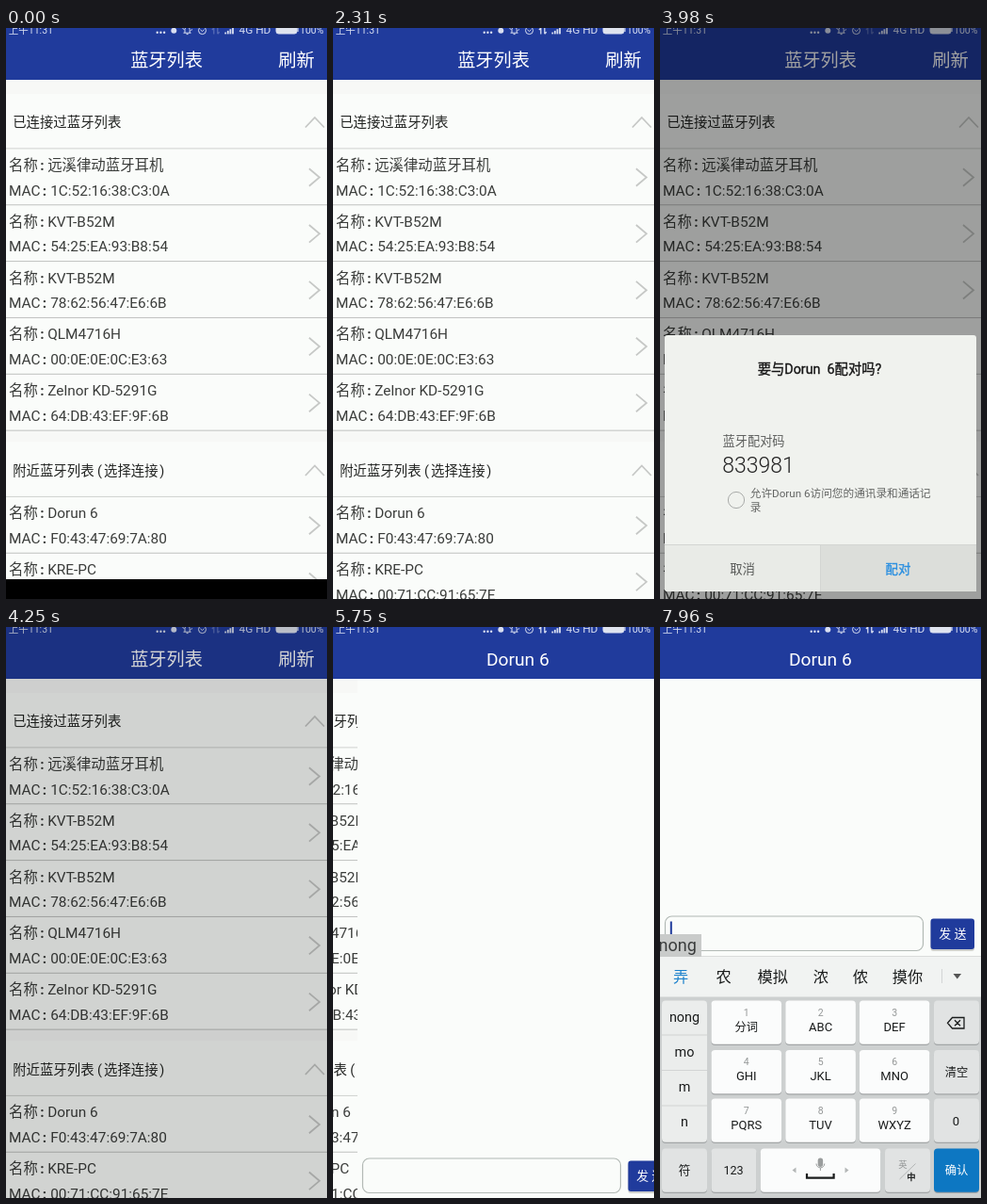
Animation of 341x606 px, one loop 8 s. Source, as an HTML page:

```html
<!DOCTYPE html>
<html lang="zh-CN">
<head>
<meta charset="utf-8">
<title>蓝牙列表</title>
<style>
html, body { margin: 0; width: 100%; height: 100%; overflow: hidden; background: #fafcfa; }
svg { display: block; width: 100%; height: 100%; }
text { font-family: Roboto, "Noto Sans CJK SC", "Noto Sans CJK", sans-serif; white-space: pre; }
</style>
</head>
<body>
<svg id="stage" viewBox="0 0 341 606"></svg>
<script>
const BLUE = '#203b9c', PAPER = '#fafcfa', LOOP = 8000;

const text = (x, y, size, fill, str, extra = '') =>
  `<text x="${x}" y="${y}" font-size="${size}" fill="${fill}" ${extra}>${str}</text>`;
const mid = (x, y, size, fill, str, extra = '') =>
  text(x, y, size, fill, str, `text-anchor="middle" ${extra}`);
const strong = (x, y, size, fill, str) =>
  mid(x, y, size, fill, str, `stroke="${fill}" stroke-width=".35"`);
const rect = (x, y, w, h, fill, extra = '') =>
  `<rect x="${x}" y="${y}" width="${w}" height="${h}" fill="${fill}" ${extra}/>`;
const path = (d, stroke, width = 1, extra = '') =>
  `<path d="${d}" fill="none" stroke="${stroke}" stroke-width="${width}" ${extra}/>`;
const group = (id, body) => `<g id="${id}">${body}</g>`;

// Device list page
const ROW = 59.85;

function device(top, name, mac) {
  const ink = '#3b3d3b';
  const line = (y, label, colonX, x, value) =>
    text(3, y, 15.4, ink, label) + text(colonX, y, 15.4, ink, ':', 'font-weight="700"') +
    text(x, y, 15.4, ink, value);
  return line(top + 22.8, '名称', 36.2, 44.2, name) +
    line(top + 49.5, 'MAC', 38.8, 47.2, mac) +
    path(`M322 ${top + 21.2}l11 9.3l-11 9.3`, '#c6c8c6', 1.8) +
    rect(0, top + ROW - 0.6, 341, 1, '#bfc1bf');
}

function section(top, title, devices, gap) {
  const first = top + 73;
  return rect(0, top, 341, gap, '#f7f8f6') + title +
    path(`M318 ${top + 50.5}l10-10.5l10 10.5`, '#c6c8c6', 1.8) +
    rect(0, first - 0.6, 341, 1, '#d0d2d0') +
    devices.map(([name, mac], i) => device(first + i * ROW, name, mac)).join('');
}

const head = (y, parts) => parts.map(([x, s]) => text(x, y, 14.4, '#222422', s)).join('');

const listPage = rect(0, 0, 341, 606, PAPER) + rect(0, 0, 341, 55, BLUE) +
  mid(170.5, 41, 19.2, '#fff', '蓝牙列表') + text(289.3, 41, 19.3, '#fff', '刷新') +
  section(55, head(105.4, [[7.2, '已连接过蓝牙列表']]), [
    ['远溪律动蓝牙耳机', '1C:52:16:38:C3:0A'],
    ['KVT-B52M', '54:25:EA:93:B8:54'],
    ['KVT-B52M', '78:62:56:47:E6:6B'],
    ['QLM4716H', '00:0E:0E:0C:E3:63'],
    ['Zelnor KD-5291G', '64:DB:43:EF:9F:6B']
  ], 15) +
  section(424.5, head(474.6, [[7.2, '附近蓝牙列表'], [97, '('], [104, '选择连接'], [163.3, ')']]), [
    ['Dorun 6', 'F0:43:47:69:7A:80'],
    ['KRE-PC', '00:71:CC:91:65:7E']
  ], 0) + rect(0, 428, 341, 11, '#f7f8f6');

// Status bar
const pale = '#d9dff1';
const statusBar = text(2.8, 6.3, 10.5, pale, '上午11:31') +
  [160.7, 164.4, 168.1].map(x => `<circle cx="${x}" cy="4.8" r="1.2" fill="${pale}"/>`).join('') +
  `<circle cx="178.3" cy="2.8" r="3" fill="${pale}"/>` +
  path('M188.5 5.2h8M190 5V1.5a2.6 2.6 0 0 1 5.2 0V5M191.6 6.6h2M187.5 0l2 2M198 1.5l-1.6 1', pale) +
  `<circle cx="208.5" cy="2.6" r="4" fill="none" stroke="${pale}"/>` +
  path('M206.5 1.8l2 1.8l2-1.8', pale) +
  group('arrows', path('M220.8 6.5V0M218.9 2l1.9-2M224.8 0V6.3M226.7 4.2l-1.9 2', pale, 1.3)) +
  [0, 1, 2, 3].map(i => rect(232.3 + i * 2.6, 4.6 - i * 1.7, 1.8, 1.8 + i * 1.7, pale)).join('') +
  text(247.6, 6.3, 11.8, pale, '4G HD') +
  rect(287, -2, 22, 8, '#dfe3ee', `rx="2.5" stroke="${pale}"`) + rect(309.4, 0, 1.2, 4, pale) +
  text(312, 6.3, 10.5, pale, '100%');

// Pairing dialog
const dialogBox = rect(5, 326, 331, 272, '#f0f2ee', 'rx="3"') +
  path('M5 548h331v47a3 3 0 0 1-3 3h-325a3 3 0 0 1-3-3z', 'none', 0, 'style="fill:#e9ebe7"') +
  rect(171, 549, 165, 49, '#dcdeda', 'id="press"') +
  strong(169.5, 367.4, 14.3, '#151515', '要与Dorun  6配对吗?') +
  text(66.6, 443.2, 13.2, '#5c5e5c', '蓝牙配对码') +
  text(66.2, 472.3, 23, '#222', '833981', 'font-weight="300"') +
  '<circle cx="81" cy="501" r="8.6" fill="none" stroke="#a9aba9"/>' +
  text(95.8, 498.4, 11.65, '#646664', '允许Dorun 6访问您的通讯录和通话记') +
  text(95.8, 513.4, 11.65, '#646664', '录') +
  rect(5, 548, 331, 1, '#d3d5d2') + rect(170, 548, 1, 50, '#d3d5d2') +
  mid(87.6, 579, 13.4, '#585a58', '取消') +
  strong(253, 579, 13.4, '#2b8fe0', '配对');

// Chat page
const chatPage = rect(0, 0, 341, 606, PAPER) + rect(0, 0, 341, 55, BLUE) +
  mid(170.3, 40.8, 19.2, '#fff', 'Dorun 6') +
  group('entry',
    rect(5.5, 564, 274, 36.5, PAPER, 'rx="7" stroke="#b2b9b5" stroke-width="1.2"') +
    rect(10.8, 569.5, 2, 26, BLUE, 'id="cursor"') +
    rect(287.5, 568.5, 46.5, 32.5, '#000', 'rx="3" opacity=".18"') +
    rect(287.5, 566.5, 46.5, 32.5, BLUE, 'rx="3"') +
    mid(310.8, 587.4, 13, '#fff', '发 送'));

// Keyboard
const INK = '#1a1c1c', SOFT = '#e1e3e3', WHITE = '#fbfcfc';
const rowY = [396.5, 449, 500.5], colX = [54.5, 133.3, 211.8];
const SLOTS = [14, 59.5, 103.5, 162.8, 204.8, 246.8];

const keyCap = (x, y, w, h, fill) =>
  rect(x, y + 1.2, w, h, '#a2a5a6', 'rx="4"') + rect(x, y, w, h, fill, 'rx="4"');

const letters = ['分词', 'ABC', 'DEF', 'GHI', 'JKL', 'MNO', 'PQRS', 'TUV', 'WXYZ'].map((s, i) => {
  const x = colX[i % 3], y = rowY[Math.floor(i / 3)], cx = x + 37.3;
  return keyCap(x, y, 74.6, 46.2, WHITE) +
    mid(cx, y + 16, 10.5, '#949797', i + 1) +
    mid(cx, y + 32, i ? 13 : 12.3, INK, s);
}).join('');

const keyboardBox = rect(0, 349, 341, 257, '#cdd0d0') +
  rect(0, 349, 341, 43.5, '#f1f3f2') + rect(0, 349, 341, 1, '#dadcdb') +
  SLOTS.map((x, i) => text(x, 376.8, 16.2, i ? INK : '#1b80cc', '', 'class="cand"')).join('') +
  rect(299, 363, 1, 15, '#d3d5d5') + '<path d="M311.5 368h8.6l-4.3 5.6z" fill="#555"/>' +
  keyCap(2, 396.5, 48, 150.2, '#ebedec') +
  [432.5, 470, 507.5].map(y => rect(2, y, 48, 1, '#d2d4d4')).join('') +
  [419, 456, 493, 529.5].map(y => mid(26, y, 14.4, INK, '', 'class="side"')).join('') +
  letters +
  rowY.map(y => keyCap(291, y, 48, 46.2, SOFT)).join('') +
  path('M310.5 414.5h12.5v11.5h-12.5l-5-5.75zM313 417.2l6 6m0-6l-6 6', INK, 1.3) +
  mid(315, 476.5, 12.3, INK, '清空') + mid(314.5, 528.6, 13, INK, '0') +
  keyCap(2, 553.5, 48, 46.2, SOFT) + mid(26, 581.2, 12.6, INK, '符') +
  keyCap(54.5, 553.5, 48, 46.2, SOFT) + mid(78, 581.4, 12.6, INK, '123') +
  keyCap(106.8, 553.5, 127.4, 46.2, WHITE) +
  rect(167.7, 563.5, 5.4, 9.5, '#9a9d9d', 'rx="2.7"') +
  path('M166 569.5a4.4 4.4 0 0 0 8.8 0M170.4 574v3', '#9a9d9d') +
  path('M156 580v4.6h28.6V580', INK, 2.2) +
  '<path d="M144.5 573.5v6l-4-3zM196.5 573.5v6l4-3z" fill="#b4b7b7"/>' +
  keyCap(239, 553.5, 48, 46.2, SOFT) +
  path('M254.5 586l17-16.5', '#b2b5b5') +
  mid(258, 574, 9.3, '#939696', '英') + strong(266.8, 586.6, 9.3, INK, '中') +
  keyCap(291, 553.5, 48, 46.2, '#0d77c2') + mid(315, 581, 12.3, '#fff', '确认') +
  group('popup', rect(0, 326, 44, 24, '#c9cbca', 'id="popBox"') +
    text(-1.5, 343.8, 18, '#3a3c3c', '', 'id="popText"'));

document.getElementById('stage').innerHTML =
  group('list', listPage) + group('chat', chatPage) + group('keyboard', keyboardBox) +
  group('status', statusBar) + rect(0, 0, 341, 606, '#000', 'id="dim"') +
  group('dialog', dialogBox) + rect(0, 585, 341, 21, '#000', 'id="nav"');

const el = id => document.getElementById(id);
const show = (id, on) => el(id).setAttribute('display', on ? 'inline' : 'none');
const shift = (id, x, y) => el(id).setAttribute('transform', `translate(${x} ${y})`);
const fill = (cls, items) => document.querySelectorAll(cls).forEach((n, i) => {
  n.textContent = items[i] || '';
});

// Value of the last [time, value] pair already reached
const at = (t, steps) => steps.reduce((v, s) => t >= s[0] ? s[1] : v, steps[0][1]);

const ARROWS = [[0, 0], [120, 1], [1230, 0], [2310, 1], [3160, 0], [3560, 1], [3680, 0],
  [5230, 1], [6170, 0], [7110, 1]];
const DIM = [[0, 0], [2610, 0.2], [2760, 0.37], [4250, 0.165], [4370, 0]];
const SLIDE = [[0, 341], [5630, 120], [5750, 26], [5900, 0]];
const CURSOR = [[0, 0], [6720, 1], [7240, 0], [7660, 1]];
const TYPED = [[0, ''], [7390, 'm'], [7510, 'mo'], [7810, 'nong']];
const SIDE = [[0, '， 。 ？ ！'], [7390, 'm n o'], [7510, 'mo o m n'], [7810, 'nong mo m n']];
const CANDS = [[0, ''], [7390, '吗 那 你们 哦 嗯 没有'], [7660, '哦 么 默默 莫 磨 摸摸'],
  [7810, '弄 农 模拟 浓 侬 摸你']];

function draw(t) {
  const x = at(t, SLIDE), typed = at(t, TYPED), typing = t >= 6840;
  show('nav', t < 1690);
  el('arrows').setAttribute('opacity', at(t, ARROWS) ? 1 : 0.3);
  el('dim').setAttribute('opacity', at(t, DIM));

  show('dialog', t >= 2610 && t < 4250);
  shift('dialog', 0, t < 2760 ? 90 : 0);
  show('press', t >= 3980 && t < 4250);

  shift('list', (x - 341) / 4, 0);
  shift('chat', x, 0);
  show('chat', x < 341);
  shift('entry', 0, typing ? -257 : 0);
  show('cursor', at(t, CURSOR));

  show('keyboard', typing);
  show('popup', typed);
  el('popText').textContent = typed;
  el('popBox').setAttribute('width', typed.length * 10 + 4);
  fill('.side', at(t, SIDE).split(' '));
  fill('.cand', at(t, CANDS).split(' '));
  document.querySelector('.side').setAttribute('opacity', t >= 7810 && t < 7960 ? 0.6 : 1);
}

const start = performance.now();
function tick() {
  draw((performance.now() - start) % LOOP);
  requestAnimationFrame(tick);
}
tick();
</script>
</body>
</html>
```
